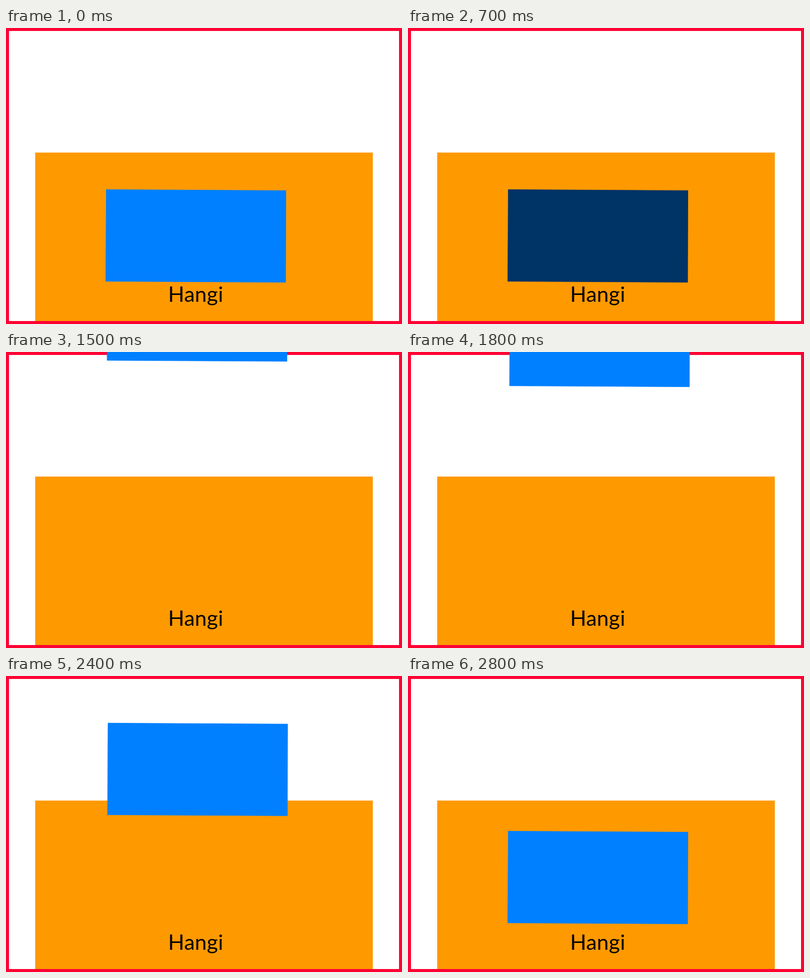
Recreate the animation shown at these times as an HTML page. Size 800 px wide and 600 px high, loop 2900 ms.

```html
<!DOCTYPE html>
<html lang="en">
<head>
<meta charset="utf-8">
<title>Hangi</title>
<style>
  html, body { margin: 0; width: 100%; height: 100%; overflow: hidden; background: #fff; }
  svg { display: block; width: 100vw; height: 100vh; }
  text { font: 43px Lato, sans-serif; letter-spacing: 0.3px; text-anchor: middle; }
</style>
</head>
<body>
<svg viewBox="0 0 800 600">
  <rect width="800" height="600" fill="#fff"/>
  <rect x="59" y="252.5" width="682" height="345" fill="#ff9900"/>
  <rect x="3" y="3" width="794" height="594" fill="none" stroke="#ff0033" stroke-width="6"/>
  <text x="383.3" y="555">Hangi</text>
  <path id="lid" d="M202.5 327.5L565.5 329.5L565 515.5L201.5 513.5Z" stroke-width="0.8"/>
</svg>
<script>
const LOOP = 2900;
const BLUE = [0, 128, 255], NAVY = [0, 51, 102], EARTH = [240, 147, 9];
const TOP = [2.7, -496.5], MID = [5.3, -341.7], LOW = [0, -13];
const lid = document.getElementById('lid');

const mix = (a, b, k) => a.map((v, i) => v + (b[i] - v) * k);

// Poses advance every 100 ms; two of them are held twice as long.
function stepAt(t) {
  const n = Math.floor(t / 100);
  return n < 14 ? n : n < 15 ? 13 : n < 17 ? 14 : n - 2;
}

function draw(ms) {
  const s = stepAt(ms % LOOP);
  let color = BLUE, pos = [0, 0];
  if (s < 14) {
    color = s < 7 ? mix(BLUE, NAVY, Math.max(0, s - 1) / 6)
                  : mix(NAVY, EARTH, (s - 7) / 6);
  } else {
    pos = s < 20 ? mix(TOP, MID, (s - 14) / 6) : mix(MID, LOW, (s - 20) / 6);
  }
  const fill = `rgb(${color.map(Math.round).join(',')})`;
  lid.setAttribute('fill', fill);
  lid.setAttribute('stroke', fill);
  lid.setAttribute('transform', `translate(${pos.join(' ')})`);
}

const start = performance.now();
function tick() {
  draw(performance.now() - start);
  requestAnimationFrame(tick);
}
tick();
</script>
</body>
</html>
```
